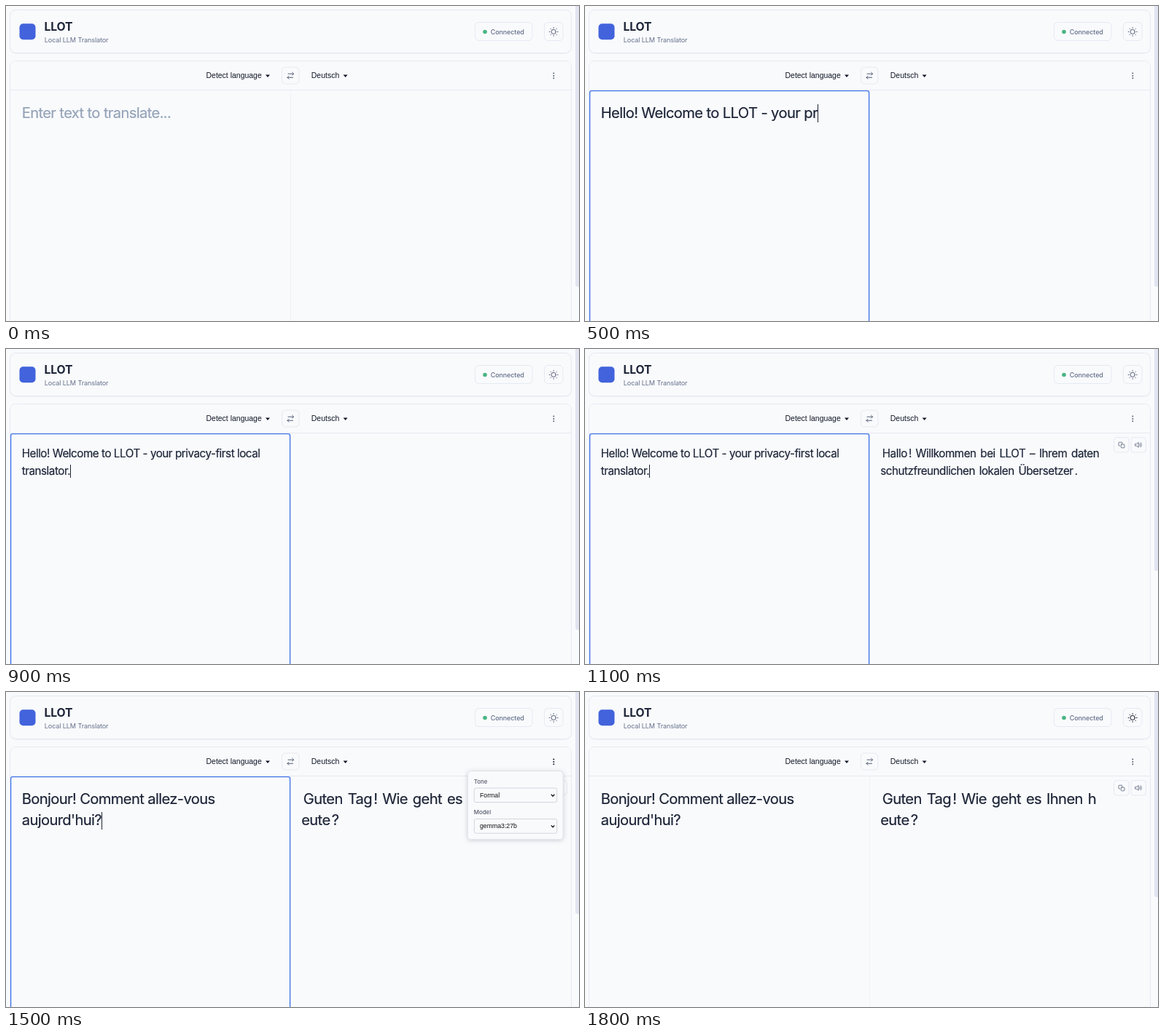
Write an HTML page that moves like this. It is 786x433 px and loops after 2 s.

```html
<!DOCTYPE html>
<html lang="en">
<head>
<meta charset="utf-8">
<title>Local LLM Translator</title>
<style>
:root {
  --page: #f8fafc; --card: #f9fafc; --bar: #f9fafc; --pill: #f9fafc; --line: #e6e9f2; --divider: #eff1f6;
  --text: #1c2437; --label: #111827; --muted: #64708b; --icon: #566078; --thumb: #e2e4f1;
}
.dark {
  --page: #22283a; --card: #374151; --bar: #22273a; --pill: #22273a; --line: #4b5567; --divider: #4b5567;
  --text: #f8fafc; --label: #fff; --muted: #e5e9f0; --icon: #e2e6ee; --thumb: #4b5567;
}
html, body { margin: 0; width: 100%; height: 100%; overflow: hidden; }
body { position: relative; background: var(--page); font-family: Inter, sans-serif; font-optical-sizing: none; }
svg { position: absolute; left: 0; top: 0; }
.card { fill: var(--card); stroke: var(--line); }
.pill { fill: var(--pill); stroke: var(--line); }
.button { fill: var(--card); stroke: var(--line); }
.icon { fill: none; stroke: var(--icon); stroke-linecap: round; stroke-linejoin: round; }
.strong { --icon: #111827; }
.dots { fill: var(--icon); }
.arial { font: 10.48px "Liberation Sans", Arial, sans-serif; fill: var(--label); }
.option { font-size: 8.73px; fill: #111; }
.caption { font-size: 7.86px; font-weight: 500; fill: #555b6b; }
.select { fill: #f9fafc; stroke: #d3d6de; }
.pane {
  position: absolute; top: 132px; color: var(--text); -webkit-text-stroke: .2px;
  font-size: 20.2px; line-height: 29.4px; letter-spacing: -.0316em; white-space: pre-wrap;
}
.pane.small { font-size: 15.2px; line-height: 23.6px; letter-spacing: -.03em; }
#input { left: 21.7px; width: 354px; overflow-wrap: break-word; }
#input.empty { color: #94a3b8; }
#output { left: 405.2px; white-space: pre; word-spacing: 1.9px; text-indent: 2.6px; }
#output i { font-style: normal; margin-left: 2.2px; }
#output span { display: block; }
#output span + span { text-indent: 0; }
.caret {
  display: inline-block; width: 0; height: 1.2em; margin-right: -1px;
  border-left: 1px solid var(--text); vertical-align: -.28em;
}
#popup { filter: drop-shadow(0 1px 3px rgb(30 37 60 / .22)); }
[hidden] { display: none !important; }
</style>
</head>
<body>
<svg width="786" height="433">
  <rect class="card" x="5.5" y="6.3" width="770" height="59" rx="8" opacity=".6"/>
  <rect class="card" x="5.5" y="5.5" width="770" height="59" rx="8"/>
  <rect x="18.5" y="24.2" width="22" height="22" rx="5" fill="#4263dc"/>
  <g style="fill:var(--text)">
    <text x="52.4" y="34.3" font-size="15.72" font-weight="700" letter-spacing="-.1">LLOT</text>
    <text x="52.8" y="50.3" font-size="9.17" letter-spacing="-.15" style="fill:var(--muted)">Local LLM Translator</text>
  </g>
  <rect class="pill" x="643.5" y="22.5" width="78.5" height="25" rx="5"/>
  <circle cx="657" cy="35.5" r="2.8" fill="#48b583"/>
  <text x="664.7" y="38.8" font-size="9" font-weight="500" letter-spacing="-.12" style="fill:var(--muted)">Connected</text>
  <rect class="button" x="738.5" y="22.5" width="25.5" height="25" rx="5"/>
  <g id="sun" class="icon">
    <circle cx="751.2" cy="35.4" r="3.1"/>
    <path id="rays"/>
  </g>
  <path id="moon" class="icon" stroke-width="1.1" d="M756.4 36.2a5.3 5.3 0 1 1-5.7-5.8a4.1 4.1 0 0 0 5.7 5.8z"/>

  <rect class="card" x="5.5" y="75.5" width="770" height="380" rx="8"/>
  <path d="M6 115V83.5q0-7.5 7.5-7.5h754q7.5 0 7.5 7.5V115z" style="fill:var(--bar)"/>
  <path d="M6 115.5H775" style="stroke:var(--line)"/>
  <path d="M390.5 116V433" style="stroke:var(--divider)"/>
  <text class="arial" x="274.5" y="99.2">Detect language</text>
  <text class="arial" x="418.8" y="99.2">Deutsch</text>
  <path d="M356 94.5h6l-3 3.6zM462.6 94.5h6l-3 3.6z" style="fill:var(--label)"/>
  <rect class="button" x="378.5" y="84" width="23.5" height="23" rx="5"/>
  <path class="icon" d="M387 93.2h7.6M392.6 91.2l2 2l-2 2M393.6 98.3h-7.6M388 96.3l-2 2l2 2"/>
  <g id="menu" class="dots">
    <circle cx="751.3" cy="92.6" r="1"/><circle cx="751.3" cy="95.9" r="1"/><circle cx="751.3" cy="99.2" r="1"/>
  </g>
  <path id="thumb" style="fill:var(--thumb)"/>
  <rect id="focus" x="6.6" y="116.6" width="383" height="330" rx="2.5" fill="none" stroke="#4778ea" stroke-width="1.4"/>
</svg>

<div id="input" class="pane"></div>
<div id="output" class="pane"></div>

<svg width="786" height="433">
  <g id="tools">
    <rect class="button" x="725.5" y="121.5" width="20.5" height="20.5" rx="4"/>
    <rect class="button" x="749" y="121.5" width="20.5" height="20.5" rx="4"/>
    <g class="icon" stroke-width=".8">
      <rect x="735.2" y="131" width="4.8" height="4.8" rx="1"/>
      <path d="M733.6 133.2h-.6q-1 0-1-1v-3q0-1 1-1h3q1 0 1 1v.6"/>
      <path d="M755 130.4h1.8l2.4-2v6.8l-2.4-2H755zM761 130.2q1.2 1.6 0 3.2M762.4 128.8q2.2 3 0 6"/>
    </g>
  </g>
  <g id="popup">
    <rect x="633.5" y="109" width="130.5" height="93.5" rx="4" fill="#f9fafc" stroke="#e1e4ec" stroke-width=".7"/>
    <text class="caption" x="641.8" y="126">Tone</text>
    <rect class="select" x="642.3" y="132" width="113.4" height="19.6" rx="2.5"/>
    <text id="tone" class="arial option" x="650" y="145">Neutral</text>
    <text class="caption" x="641.8" y="168.4">Model</text>
    <rect class="select" x="642.3" y="174.6" width="113.4" height="19.6" rx="2.5"/>
    <text class="arial option" x="650" y="187.4">gemma3:27b</text>
    <path d="M747.8 140.8l2.3 2.4l2.3-2.4M747.8 183.4l2.3 2.4l2.3-2.4" fill="none" stroke="#111" stroke-width="1.3"/>
  </g>
</svg>

<script>
const el = id => document.getElementById(id);
const LOOP = 2000, STEP = 100;
const ENGLISH = "Hello! Welcome to LLOT - your privacy-first local translator.";
const FRENCH = "Bonjour! Comment allez-vous aujourd'hui?";
const HELLO_PART = "<span>Hallo<i>!</i> Willkommen bei</span>";
const HELLO_FULL = "<span>Hallo<i>!</i> Willkommen bei LLOT – Ihrem daten</span>" +
  "<span>schutzfreundlichen lokalen Übersetzer<i>.</i></span>";
const BONJOUR = "<span>Guten Tag<i>!</i> Wie geht es Ihnen h</span><span>eute<i>?</i></span>";

el("rays").setAttribute("d", Array.from({ length: 8 }, (_, i) => {
  const x = Math.cos(i * Math.PI / 4), y = Math.sin(i * Math.PI / 4);
  const at = r => `${751.2 + r * x} ${35.4 + r * y}`;
  return `M${at(5.1)}L${at(6)}`;
}).join(""));

const show = (id, on) => el(id).toggleAttribute("hidden", !on);

function typed(t) {
  if (t < 1400) return ENGLISH.slice(0, 8 * (t / STEP - 1));
  return t < 1500 ? FRENCH.slice(0, 20) : FRENCH;
}

function translated(t) {
  if (t < 1000) return "";
  if (t < 1100) return HELLO_PART;
  if (t < 1400) return HELLO_FULL;
  return t < 1500 ? "" : BONJOUR;
}

function draw(t) {
  const between = (a, b) => t >= a && t < b;
  const focused = between(200, 1200) || between(1400, 1600);
  const dark = between(1600, 1800);
  const empty = t < 200;
  const text = empty ? "Enter text to translate..." : typed(t);
  const input = el("input");

  document.body.classList.toggle("dark", dark);
  input.textContent = text;
  input.classList.toggle("empty", empty);
  input.classList.toggle("small", text.length > 50);
  if (focused) input.insertAdjacentHTML("beforeend", '<span class="caret"></span>');

  el("output").innerHTML = translated(t);
  el("output").classList.toggle("small", t < 1400);
  el("tone").textContent = t < 1300 ? "Neutral" : "Formal";
  el("menu").classList.toggle("strong", between(1200, 1600));
  el("sun").classList.toggle("strong", t >= 1800);
  show("focus", focused);
  show("tools", t >= 1000);
  show("popup", between(1200, 1600));
  show("sun", !dark);
  show("moon", dark);

  const end = t < 1000 ? 386 : t < 1600 ? 305 : 282;
  el("thumb").setAttribute("d", `M781 0H786V${end}H784q-3 0-3-3z`);
}

const start = performance.now();
let last = -1;
function tick() {
  const elapsed = Math.max(0, performance.now() - start) % LOOP;
  const t = Math.floor(elapsed / STEP) * STEP;
  if (t !== last) draw(last = t);
  requestAnimationFrame(tick);
}
tick();
</script>
</body>
</html>
```
